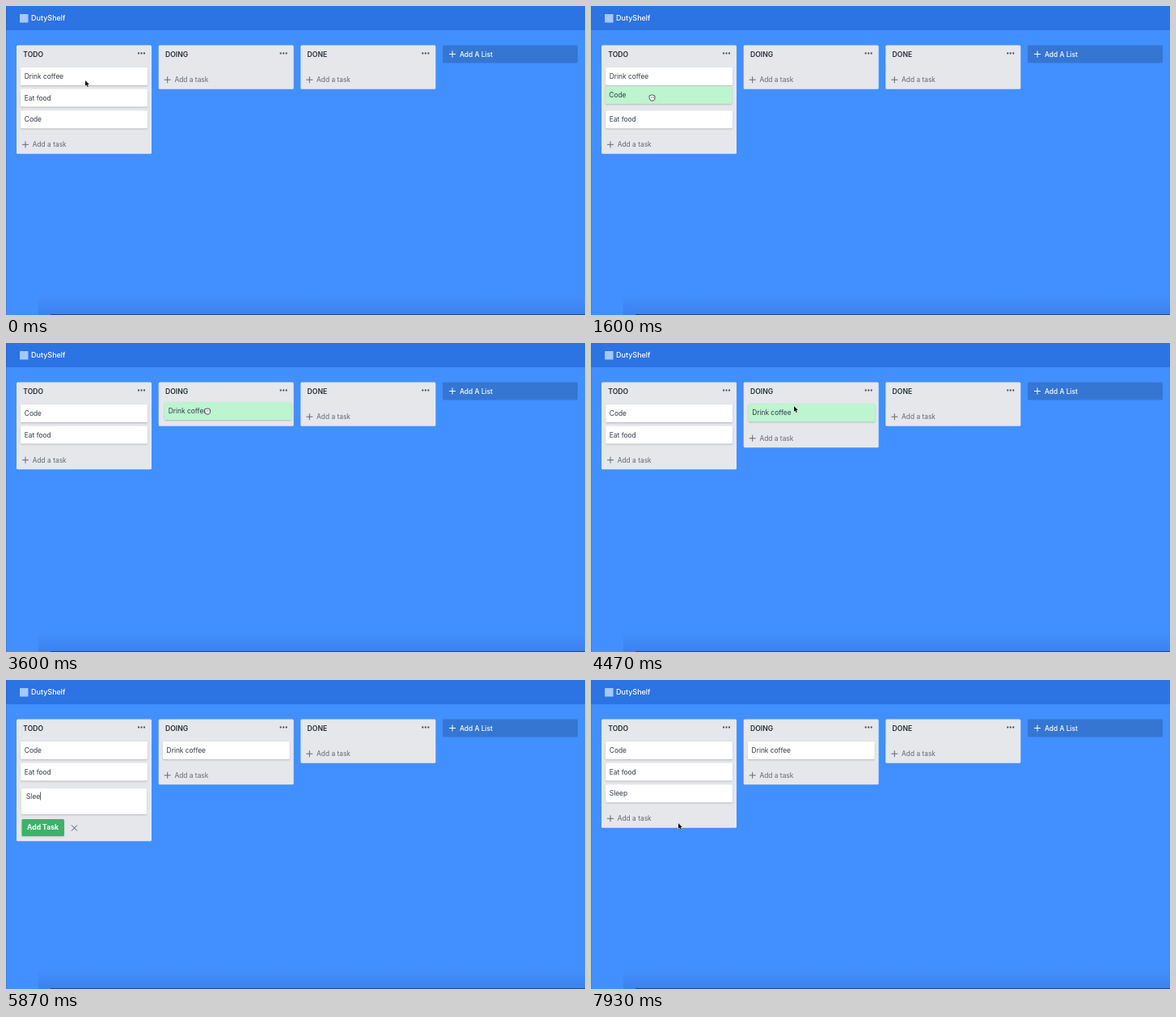
Animation of 716 by 382 pixels, one loop 8 s. Source, as an HTML page with a canvas:

```html
<!DOCTYPE html>
<html lang="en">
<head>
<meta charset="utf-8">
<title>Task board</title>
<style>
html, body { margin: 0; width: 100%; height: 100%; overflow: hidden; background: #428fff; }
canvas { display: block; }
</style>
</head>
<body>
<canvas id="stage" width="716" height="382"></canvas>
<script>
const ctx = document.getElementById('stage').getContext('2d');
const LOOP = 8000, STEP = 26.6, TOP = 76, COLUMN_X = [13, 188.7, 364.3, 540];
const INK = '#303846', MUTED = '#646970';

// Cursor stops: time, x, y
const PATH = [
  [0, 98, 92], [70, 98, 92], [200, 92, 99], [670, 92, 99], [1000, 76, 143], [1130, 76, 143],
  [1530, 75.5, 113], [1870, 75.5, 113], [2200, 76, 111], [2670, 70, 87], [3130, 71, 87],
  [3560, 249, 84], [4330, 249, 84], [4470, 251, 78], [4540, 248, 82], [5000, 80, 143],
  [6600, 80, 143], [7070, 82, 206], [7800, 84, 206], [7930, 108, 177], [8000, 108, 177]
];

const mix = (a, b, k) => a + (b - a) * k;
function ease(t, from, to) {
  const k = Math.min(1, Math.max(0, (t - from) / (to - from)));
  return k * k * (3 - 2 * k);
}
function cursorAt(t) {
  const i = PATH.findIndex(stop => stop[0] > t);
  const a = PATH[i - 1], b = PATH[i], k = ease(t, a[0], b[0]);
  return { x: mix(a[1], b[1], k), y: mix(a[2], b[2], k) };
}

function box(x, y, w, h, fill, radius = 1.5, shadow = 0) {
  ctx.save();
  ctx.shadowColor = `rgba(0,0,0,${shadow})`;
  ctx.shadowBlur = 2;
  ctx.shadowOffsetY = shadow ? 1 : 0;
  ctx.fillStyle = fill;
  ctx.beginPath();
  ctx.roundRect(x, y, w, h, radius);
  ctx.fill();
  ctx.restore();
}
function label(text, x, middle, color, weight = 400, size = 8.4) {
  ctx.font = `${weight} ${size}px Inter, sans-serif`;
  ctx.fillStyle = color;
  ctx.fillText(text, x, middle + 3.1);
}
function stroke(path, color, width = 1) {
  ctx.strokeStyle = color;
  ctx.lineWidth = width;
  ctx.stroke(new Path2D(path));
}
function plus(x, y, color) {
  stroke(`M${x - 4} ${y}h8M${x} ${y - 4}v8`, color);
}

function column(index, title, bottom, open) {
  const x = COLUMN_X[index];
  box(x, 48.5, 167, bottom - 48.5, '#e5e7eb');
  label(title, x + 8.3, 60, '#252d3a', 600, 8.6);
  ctx.fillStyle = '#4b5568';
  for (let i = 0; i < 3; i++) {
    ctx.beginPath();
    ctx.arc(x + 151 + i * 3.5, 58.5, 1.15, 0, 7);
    ctx.fill();
  }
  if (open) return;
  plus(x + 11, bottom - 11.5, MUTED);
  label('Add a task', x + 19.7, bottom - 11.5, MUTED);
}

function card(text, x, y, green, hover) {
  box(x, y, 157, 22, green ? '#bcf5d0' : '#fff', 1.5, 0.2);
  label(text, x + 4.8, y + 11, INK);
  if (hover) pencil(x + 149, y + 11);
}
function pencil(x, y) {
  ctx.save();
  ctx.translate(x, y);
  ctx.rotate(-Math.PI / 4);
  ctx.fillStyle = '#404853';
  ctx.fill(new Path2D('M-5.5 0L-3.5-1.5H2.5V1.5H-3.5ZM3.2-1.5H5V1.5H3.2Z'));
  ctx.restore();
}

function form(y, text, caret) {
  box(19, y, 155, 32, '#fff', 1.5, 0.18);
  label(text || 'What needs to be done?', 25, y + 9.5, text ? INK : '#a0a8b5');
  if (caret) {
    const x = 25.4 + (text ? ctx.measureText(text).width : 0);
    stroke(`M${x} ${y + 4.5}v10`, '#333', 0.8);
  }
  box(19.5, y + 38, 52.5, 21, '#3bb36b', 1.5, 0.15);
  label('Add Task', 26, y + 48.3, '#fff', 700, 8.6);
  stroke(`M81 ${y + 45.5}l7 7m0-7l-7 7`, '#505762');
}

function arrow(x, y) {
  ctx.save();
  ctx.translate(x, y);
  const shape = new Path2D('M0 0V6.8L1.6 5.4L2.7 8L4 7.4L2.9 5H5Z');
  ctx.lineWidth = 1;
  ctx.strokeStyle = '#fff';
  ctx.stroke(shape);
  ctx.fillStyle = '#111';
  ctx.fill(shape);
  ctx.restore();
}
function hand(x, y, closed) {
  ctx.save();
  ctx.translate(x, y);
  const shape = new Path2D(closed
    ? 'M-3.5-1Q-3.5-3-1.8-2.5Q0-3.6 1.5-2.7Q3.8-3 3.6 0Q3.6 3.2 1.8 4H-1.6Q-3.7 2-3.5-1Z'
    : 'M-3.5 0Q-4-1-2.5-.8V-3.2Q-1.8-4.5-1-3.4Q-.2-5 .7-3.4Q1.8-4.3 2.3-2.6Q3.7-3 3.6-1V1Q3.4 3.3 2 4.3H-1.2Z');
  ctx.fillStyle = '#fff';
  ctx.fill(shape);
  ctx.lineWidth = 0.8;
  ctx.strokeStyle = '#222';
  ctx.stroke(shape);
  stroke(closed ? 'M-1-1V.5M.5-1V.5M2-1V.5' : 'M-1-2.5V0M.6-2.5V0M2.1-2V0', '#444', 0.5);
  ctx.restore();
}

function backdrop() {
  ctx.fillStyle = '#428fff';
  ctx.fillRect(0, 0, 716, 382);
  const shade = ctx.createLinearGradient(0, 358, 0, 382);
  shade.addColorStop(0, 'rgba(20,60,140,0)');
  shade.addColorStop(1, 'rgba(20,60,140,.16)');
  ctx.fillStyle = shade;
  ctx.fillRect(40, 358, 676, 24);
  ctx.fillStyle = '#2c73e3';
  ctx.fillRect(0, 0, 716, 30);
  ctx.fillStyle = 'rgba(20,50,110,.2)';
  ctx.fillRect(0, 0, 0.8, 382);
  ctx.fillStyle = 'rgba(20,40,80,.65)';
  ctx.fillRect(55, 381, 661, 1);
  box(17, 10, 10.5, 10.5, '#a3c8fb', 0.5);
  label('DutyShelf', 31, 15.3, '#fff', 500, 9);
  box(COLUMN_X[3], 48.5, 167, 22, '#3576d2');
  plus(552, 59.5, '#fff');
  label('Add A List', 561, 59.7, '#fff', 500);
}

function draw(t) {
  const pointer = cursorAt(t);
  const dragCode = t >= 1100 && t < 1870, dropCode = t >= 1870 && t < 2150;
  const dragDrink = t >= 3100 && t < 4330, dropDrink = t >= 4330 && t < 4540;
  const dragging = dragCode || dragDrink;
  const open = t >= 5130 && t < 7700, added = t >= 6330;
  const leave = ease(t, 3300, 3500), grow = ease(t, 3610, 3800);
  const swap = ease(t, 1270, 1450);

  backdrop();
  const bottom = 182.8 - STEP * leave + (added ? STEP : 0);
  column(0, 'TODO', open ? bottom + 43 : bottom, open);
  column(1, 'DOING', 102.7 + STEP * grow);
  column(2, 'DONE', 102.7);

  const code = { text: 'Code', x: 18, y: TOP + STEP * (t < 1100 ? 2 : 1 - leave) };
  if (dragCode) {
    code.x += pointer.x - 76;
    code.y = 129 + pointer.y - 143;
  } else if (dropCode) {
    code.y = mix(99, TOP + STEP, ease(t, 1870, 2150));
  }
  code.green = dragCode || dropCode;

  const drink = { text: 'Drink coffee', x: t < 3100 ? 18 : 193.8, y: TOP };
  if (dragDrink) {
    drink.x = 18 + pointer.x - 71;
    drink.y = TOP + pointer.y - 87;
  } else if (dropDrink) {
    const k = ease(t, 4330, 4540);
    drink.x = mix(196, 193.8, k);
    drink.y = mix(73, TOP, k);
  }
  drink.green = dragDrink || dropDrink;

  const cards = [{ text: 'Eat food', x: 18, y: TOP + STEP * (1 + swap - leave) }, code, drink];
  if (added) cards.push({ text: 'Sleep', x: 18, y: TOP + STEP * 2 });
  cards.sort((a, b) => !!a.green - !!b.green);
  let grab = false;
  for (const c of cards) {
    const hover = t >= 70 && !open && !c.green && !dragging &&
      pointer.x > c.x && pointer.x < c.x + 157 && pointer.y > c.y && pointer.y < c.y + 22;
    grab = grab || hover;
    card(c.text, c.x, c.y, c.green, hover);
  }

  if (open) {
    const typed = [5400, 5670, 5740, 5870, 6000].filter(time => t >= time).length;
    form(added ? 160.6 : 134, added ? '' : 'Sleep'.slice(0, typed), t < 6900);
  }

  const typing = t >= 5400 && t < 6600;
  if (dragging || grab) hand(pointer.x, pointer.y, dragging);
  else if (!typing) arrow(pointer.x, pointer.y);
}

function frame() {
  draw(performance.now() % LOOP);
  requestAnimationFrame(frame);
}
frame();
</script>
</body>
</html>
```
